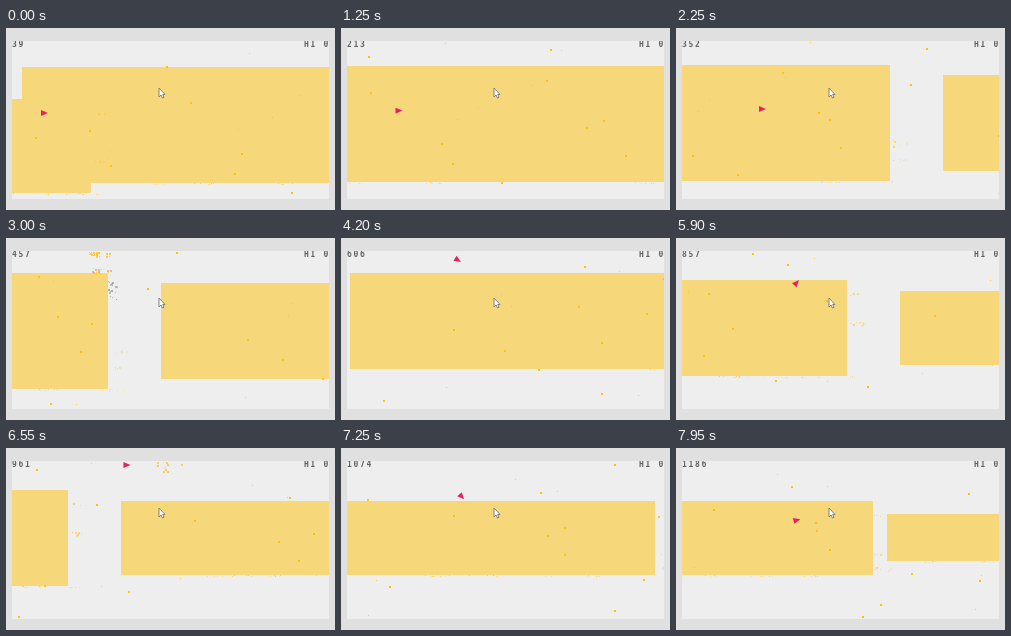
Write an HTML page with a canvas that moves like this. It is 329 by 182 pixels and loops after 8000 ms.

```html
<!DOCTYPE html>
<html lang="en">
<head>
<meta charset="utf-8">
<style>
  html, body { margin: 0; width: 100%; height: 100%; overflow: hidden; background: #e0e0e0; }
  canvas { display: block; }
</style>
</head>
<body>
<canvas id="stage" width="329" height="182"></canvas>
<script>
const ctx = document.getElementById('stage').getContext('2d');
const LOOP = 8000, STEP = 50;
const PANEL = { x: 6, y: 13, w: 317, h: 158 };
const RED = '#e91e63', YELLOW = '#ffc107', FIELD = '#f6d87a', INK = '#616161';
const HIT = 3000, FASTER = 5250;

const fields = [
  { left: -20, right: 85, top: 71, bottom: 165 },
  { left: 16, right: 550, top: 39, bottom: 155 },
  { left: 603, right: 1031, top: 49, bottom: 145 },
  { left: 1084, right: 1400, top: 60, bottom: 134 },
  { left: 1414, right: 1800, top: 73, bottom: 120 }
];

const clamp = u => Math.min(1, Math.max(0, u));
const smooth = u => clamp(u) ** 2 * (3 - 2 * clamp(u));
const hump = (t, center, radius) => smooth(1 - Math.abs(t - center) / radius);
const mod = (value, size) => ((value % size) + size) % size;

function random(seed) {
  const value = Math.sin(seed * 127.1 + 11.7) * 43758.5453;
  return value - Math.floor(value);
}

// Steady running, held up for a moment after the hit, quicker later on.
function advance(t, rate, delay, boost) {
  return rate * (t - delay * clamp((t - HIT) / 1200)) + boost * Math.max(0, t - FASTER);
}
const scrollAt = t => advance(t, 0.1493, 222, 0.0184);
const scoreAt = t => 39 + advance(t, 0.1395, 130, 0.021);
const cameraAt = t => Math.round(-7 * clamp(t / FASTER) ** 1.22 - 8.7 * hump(t, 4200, 1000));

// The player glides at first, then bounces.
const playerX = t => 120.5 - 82.5 * Math.exp(-t * t / 5.8e6);
function playerY(t) {
  const glide = 83 + 2 * Math.cos(t / 700);
  const bounce = 45 - 28 * Math.cos((t - 6550) / 2600 * 2 * Math.PI);
  return glide + (bounce - glide) * smooth((t - 2250) / 700);
}

function square(x, y, size, color, alpha = 1) {
  ctx.globalAlpha = alpha;
  ctx.fillStyle = color;
  ctx.fillRect(Math.round(x), Math.round(y), size, size);
  ctx.globalAlpha = 1;
}

function drawFields(scroll, camera) {
  ctx.fillStyle = FIELD;
  for (const { left, right, top, bottom } of fields) {
    ctx.fillRect(Math.round(left - scroll), top + camera, right - left, bottom - top);
  }
}

// Crumbs fall off the back edge in rows and along the bottom edge in patches.
function drawCrumbs(t, scroll, camera) {
  fields.forEach(({ left, right, top, bottom }, n) => {
    for (let i = 0; i < 30; i++) {
      const seed = n * 97 + i, row = random(n * 9 + i % 3 + 1);
      const life = mod(t / 900 + random(seed), 1);
      const x = right - scroll + 2 + life * 20;
      const y = top + camera + (0.05 + 0.85 * row) * (bottom - top) + random(seed + 5) * 3;
      if (i < 15) square(x, y, random(seed + 2) > 0.6 ? 2 : 1, YELLOW, 0.6 * (1 - life));
      const patch = left + random(n * 5 + i % 5) * (right - left) - scroll;
      square(patch + random(seed + 8) * 25, bottom + camera + life * 2, 1, YELLOW, 0.7 * (1 - life));
    }
  });
}

function drawDots(t) {
  for (let i = 0; i < 15; i++) {
    const speed = 0.08 + random(i + 0.4) * 0.06;
    const x = mod(random(i) * 330 - t * speed, 330);
    const y = mod(random(i + 50) * 158 - t * 0.008, 158);
    square(PANEL.x + x - 4, PANEL.y + y, i < 10 ? 2 : 1, YELLOW, i < 10 ? 1 : 0.7);
  }
}

function drawSpray(t, time, x, y, w, h, count, colors) {
  const strength = hump(t, time, 400), drift = scrollAt(time) - scrollAt(t);
  if (!strength) return;
  for (let i = 0; i < count; i++) {
    const color = colors[i % colors.length];
    square(x + random(i + time) * w + drift, y + random(i + time + 40) * h, 1 + i % 2, color, 0.7 * strength);
  }
}

function drawPlayer(t) {
  const slope = (playerY(t + 20) - playerY(t - 20)) / 40;
  ctx.save();
  ctx.globalAlpha = 1 - hump(t, HIT, 250);
  ctx.translate(playerX(t), playerY(t));
  ctx.rotate(Math.atan2(slope, 0.06));
  ctx.fillStyle = RED;
  ctx.fill(new Path2D('M-3-3L4 0L-3 3Z'));
  ctx.restore();
}

function drawText(t) {
  ctx.font = 'bold 8px "DejaVu Sans Mono", monospace';
  ctx.letterSpacing = '1.7px';
  ctx.fillStyle = INK;
  ctx.fillText(Math.floor(scoreAt(t)), 6, 19);
  ctx.fillText('HI 0', 298, 19);
}

function drawCursor() {
  const arrow = new Path2D('M153 60V69L155 67L156.5 70L158 69.3L156.7 66.5H159Z');
  ctx.fillStyle = '#fff';
  ctx.strokeStyle = '#777';
  ctx.lineWidth = 0.9;
  ctx.fill(arrow);
  ctx.stroke(arrow);
}

function draw(now) {
  const t = Math.floor((now % LOOP) / STEP) * STEP;
  const scroll = scrollAt(t), camera = cameraAt(t);
  const { x, y, w, h } = PANEL;
  ctx.fillStyle = '#e0e0e0';
  ctx.fillRect(0, 0, 329, 182);
  ctx.save();
  ctx.beginPath();
  ctx.rect(x, y, w, h);
  ctx.clip();
  ctx.fillStyle = '#eee';
  ctx.fillRect(x, y, w, h);
  drawFields(scroll, camera);
  drawCrumbs(t, scroll, camera);
  drawDots(t);
  drawSpray(t, HIT, 83, 13, 20, 5, 24, [YELLOW]);
  drawSpray(t, HIT, 85, 29, 19, 8, 14, [YELLOW, '#e8a070']);
  drawSpray(t, HIT, 102, 41, 8, 20, 16, ['#8a93a8', '#a9a9a9', '#9fb0a0']);
  drawSpray(t, 6550, 147, 13, 32, 12, 16, [FIELD, YELLOW]);
  drawPlayer(t);
  drawText(t);
  ctx.restore();
  drawCursor();
}

let start;
function tick(now) {
  start ??= now;
  draw(now - start);
  requestAnimationFrame(tick);
}
draw(0);
requestAnimationFrame(tick);
</script>
</body>
</html>
```
